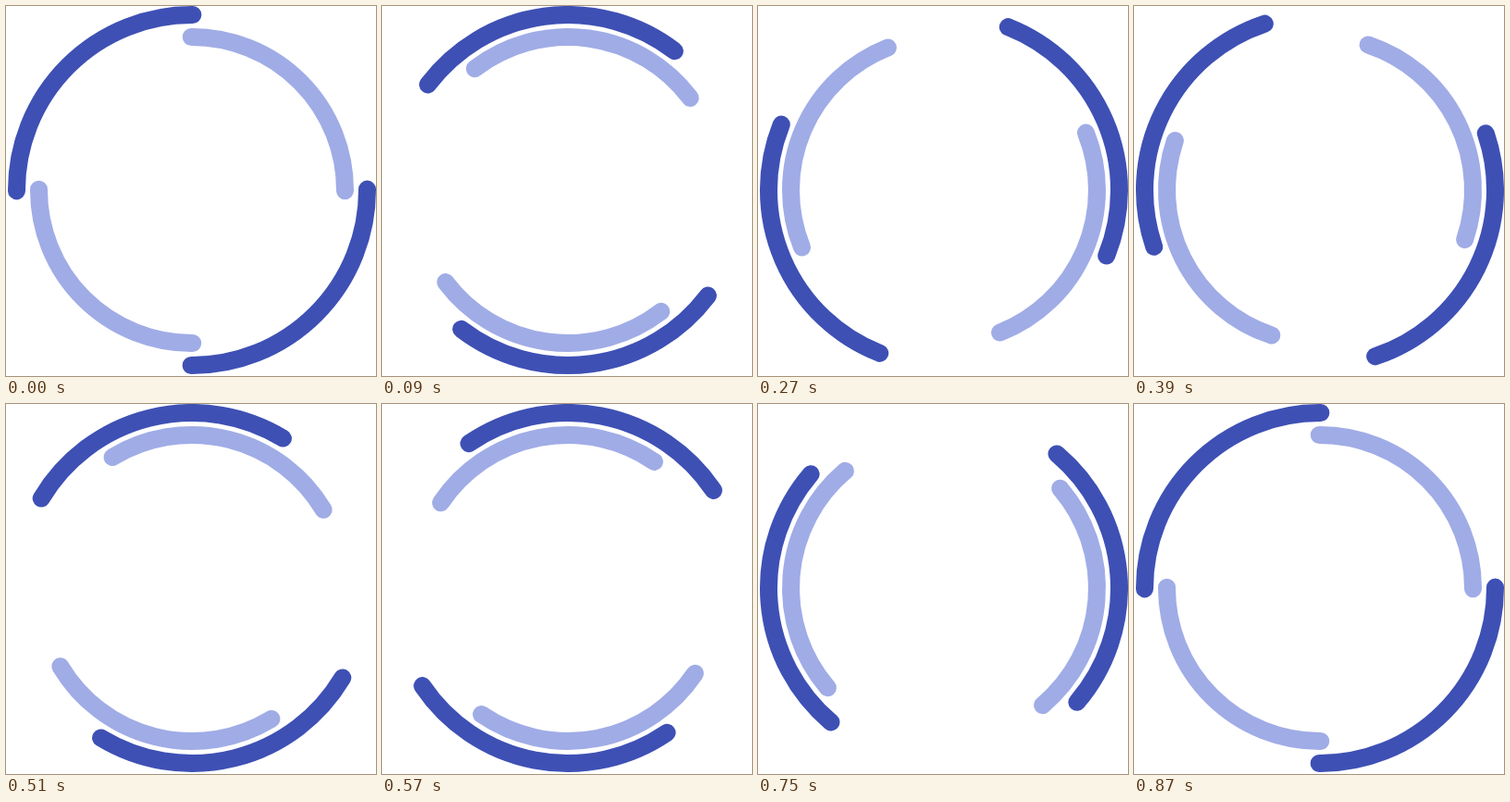
Write an HTML page that moves like this. It is 400 px wide and 400 px high and loops after 0.9 s.

```html
<!DOCTYPE html>
<html lang="en">
<head>
<meta charset="utf-8">
<title>Double ring spinner</title>
<style>
  html, body { margin: 0; width: 100%; height: 100%; overflow: hidden; background: #fff; }
  svg { display: block; width: 100%; height: 100%; }
  circle {
    fill: none;
    stroke-width: 19;
    stroke-linecap: round;
    stroke-dasharray: 1.006 .994;
    stroke-dashoffset: .003;
  }
</style>
</head>
<body>
<svg viewBox="0 0 400 400">
  <g transform="translate(201 199)">
    <circle id="outer" r="189.5" pathLength="4" stroke="#3e50b4"/>
    <circle id="inner" r="165.5" pathLength="4" stroke="#a0ace6"/>
  </g>
</svg>
<script>
  const STEP_MS = 30, STEPS = 30;
  const outer = document.getElementById('outer');
  const inner = document.getElementById('inner');

  // The first and last steps share a pose, so one turn spans STEPS - 1 intervals.
  function draw() {
    const step = Math.floor(performance.now() / STEP_MS) % STEPS;
    const angle = step * 360 / (STEPS - 1);
    outer.setAttribute('transform', `rotate(${angle})`);
    inner.setAttribute('transform', `rotate(${90 - angle})`);
    requestAnimationFrame(draw);
  }
  draw();
</script>
</body>
</html>
```
